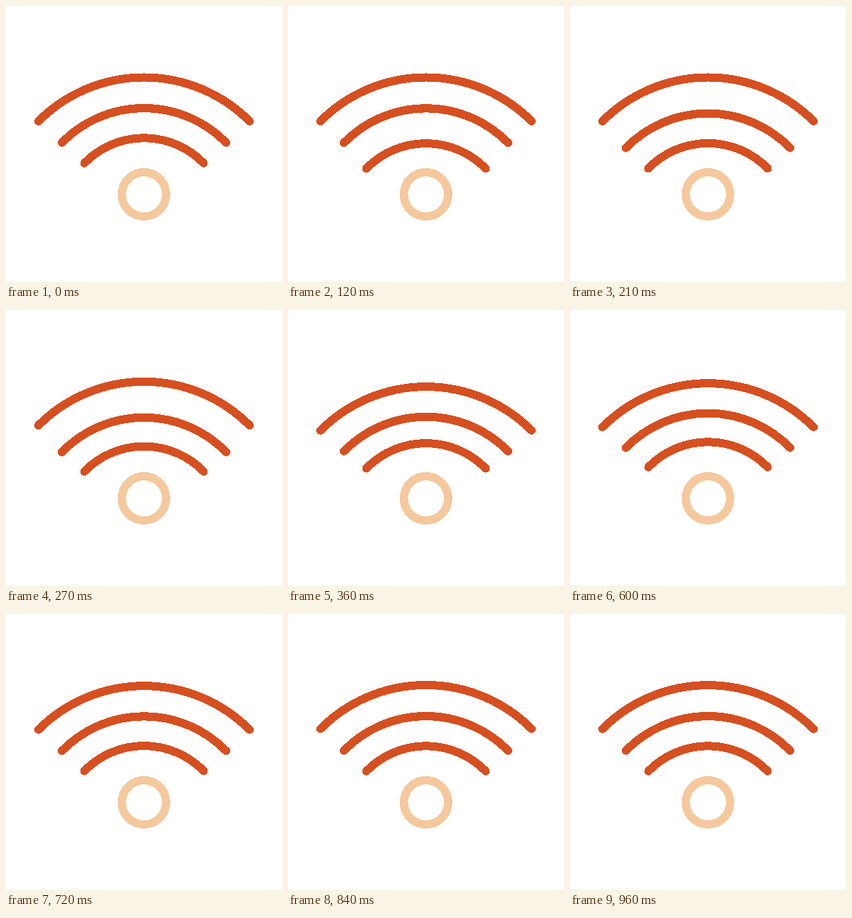
An HTML page for the animation above (3.05 s loop, 400 px wide and 400 px high).

```html
<!DOCTYPE html>
<html lang="en">
<head>
<meta charset="utf-8">
<title>Wireless signal</title>
<style>
  html, body { margin: 0; width: 100%; height: 100%; overflow: hidden; background: #fff; }
  svg { display: block; width: 100%; height: 100%; }
</style>
</head>
<body>
<svg viewBox="0 0 400 400" fill="none" stroke-width="12" stroke-linecap="round" shape-rendering="crispEdges">
  <circle cx="200" cy="273" r="32" stroke="#f5c89d"/>
  <g stroke="#d64f20">
    <path class="wave" d="M113.5 227.8A120.7 120.7 0 0 1 286.5 227.8"/>
    <path class="wave" d="M81 198A166.6 166.6 0 0 1 319 198"/>
    <path class="wave" d="M47 167A216 216 0 0 1 353 167"/>
  </g>
</svg>
<script>
  const LOOP = 3050, STEP = 30, DROP = 7.8;
  const DELAYS = [0, 105, 255];
  const FALL_END = 115, RISE_START = 180, RISE_END = 385, SETTLED = 730;
  const waves = [...document.querySelectorAll('.wave')];

  // Fall, short hold, accelerating return, then a damped swing around rest.
  function offset(t) {
    if (t <= 0 || t >= SETTLED) return 0;
    if (t < FALL_END) return DROP * (1 - Math.cos(Math.PI * t / FALL_END)) / 2;
    if (t < RISE_START) return DROP;
    if (t < RISE_END) {
      const p = (t - RISE_START) / (RISE_END - RISE_START);
      return DROP * (1 - p * p);
    }
    const s = t - RISE_END;
    return -4 * Math.sin(Math.PI * s / 72) * Math.exp(-s / 125);
  }

  function draw(time) {
    const t = Math.floor((time % LOOP) / STEP) * STEP;
    waves.forEach((wave, i) => {
      wave.setAttribute('transform', `translate(0 ${offset(t - DELAYS[i]).toFixed(2)})`);
    });
  }

  const start = performance.now();
  function tick() {
    draw(performance.now() - start);
    requestAnimationFrame(tick);
  }
  tick();
</script>
</body>
</html>
```
